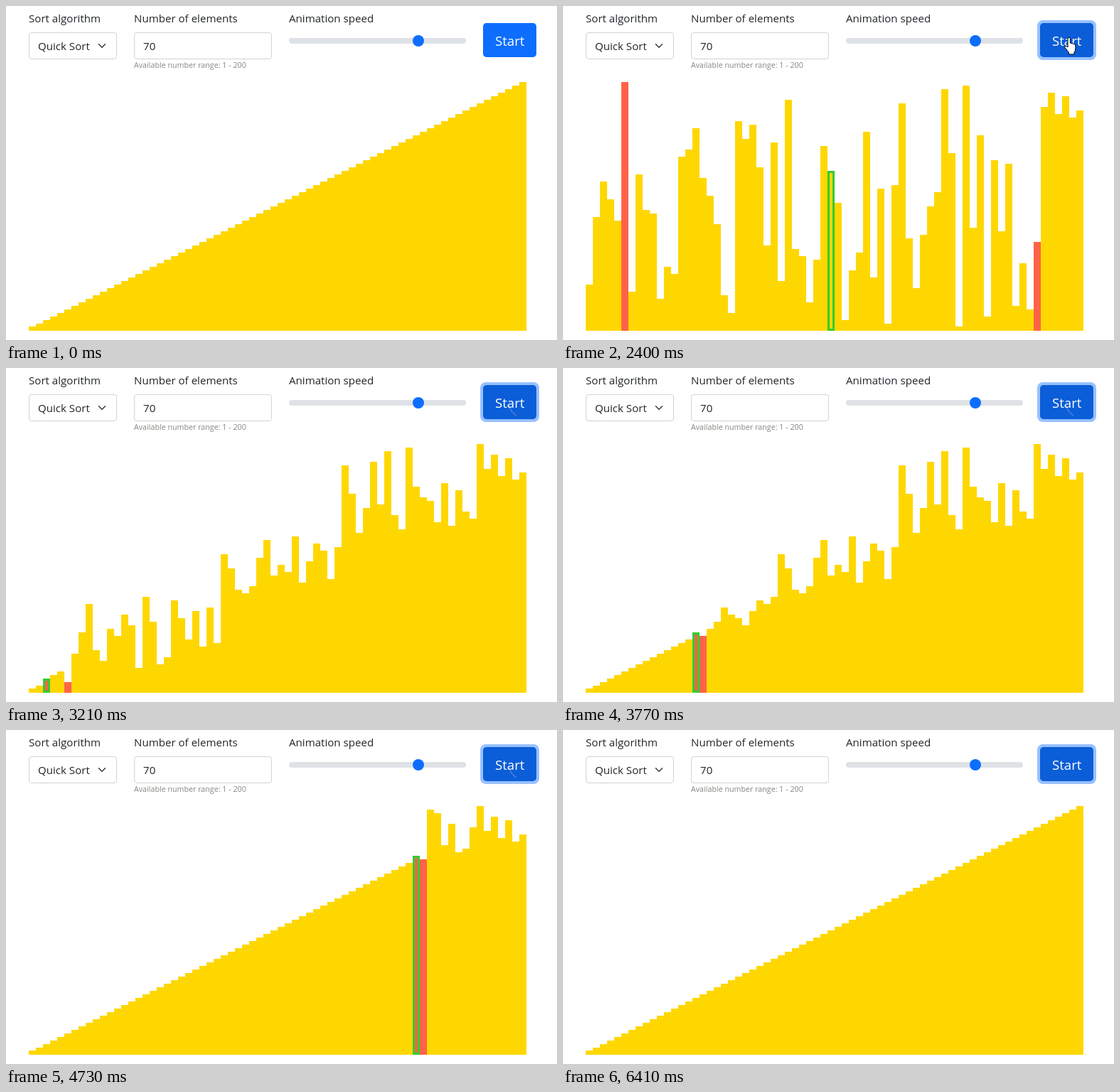
Write an HTML page that moves like this. It is 775 px wide and 470 px high and loops after 6.48 s.

```html
<!DOCTYPE html>
<html lang="en">
<head>
<meta charset="utf-8">
<title>Sort visualizer</title>
<style>
  html, body { margin: 0; height: 100%; overflow: hidden; background: #fff; }
  svg { display: block; font: 15.1px "Open Sans", "Noto Sans", sans-serif; fill: #212529; }
  .field { fill: #fff; stroke: #ced4da; }
  .cursor { fill: #fff; stroke: #000; stroke-linejoin: round; }
</style>
</head>
<body>
<svg width="775" height="470" viewBox="0 0 775 470">
  <text x="32" y="23">Sort algorithm</text>
  <rect class="field" x="32.5" y="37.5" width="123" height="37" rx="3.5"/>
  <text x="45" y="62">Quick Sort</text>
  <path d="M130.5 53.75l4.5 4.5 4.5-4.5" fill="none" stroke="#343a40" stroke-width="1.5" stroke-linecap="round" stroke-linejoin="round"/>

  <text x="180" y="23">Number of elements</text>
  <rect class="field" x="180.5" y="37.5" width="193" height="37" rx="3.5"/>
  <text x="193" y="62">70</text>
  <text x="180" y="87" font-size="10.7" fill="#8a8580">Available number range: 1 - 200</text>

  <text x="398" y="23">Animation speed</text>
  <rect x="398" y="45" width="249" height="8" rx="4" fill="#dee2e6"/>
  <circle cx="580" cy="49" r="8" fill="#0d6efd"/>

  <rect id="ring" x="667" y="20" width="83" height="56" rx="8" fill="#98c1fe"/>
  <rect id="button" x="671" y="24" width="75" height="48" rx="4.8"/>
  <path id="trail" d="M708 53q1 8 10 14" fill="none" stroke="#7f8fe0" stroke-width="2" opacity=".5"/>
  <text x="688" y="56" font-size="18.7" fill="#fff">Start</text>

  <path id="bars" fill="#ffd700"/>
  <path id="active" fill="#ff6347"/>
  <path id="pivot" fill="#32cd32" fill-rule="evenodd"/>

  <path id="arrow" class="cursor" d="M.5.5V16.5L4 13l2.7 6 2.4-1-2.6-6H11.5z"/>
  <path id="hand" class="cursor" d="M-1 14V3a1.7 1.7 0 0 1 3.4 0V9l5.5 1.5q2 .6 2 2.5v4q0 3-2 5.5V25H.5V22.5L-5 15.5q-1-2 1-2.3Q-2.5 13-1 15z"/>
</svg>
<script>
const LOOP = 6480, SORT_START = 2400, STEP = 13.09;
const $ = id => document.getElementById(id);
const show = (id, on) => $(id).setAttribute("visibility", on ? "visible" : "hidden");

const shuffled = [
  13, 32, 42, 37, 31, 70, 11, 44, 34, 33, 9, 18, 16, 49, 51, 57, 43, 38, 30, 10,
  5, 59, 54, 58, 46, 24, 53, 14, 65, 23, 21, 8, 20, 52, 45, 36, 3, 17, 22, 56,
  15, 40, 2, 41, 64, 26, 12, 27, 35, 39, 68, 50, 1, 69, 29, 55, 4, 48, 28, 47,
  7, 19, 6, 25, 63, 67, 61, 66, 60, 62];
const sorted = shuffled.map((_, i) => i + 1);

// Every swap is seen twice: before and after the exchange.
const steps = [];
function quickSort(a, lo, hi) {
  const mid = (lo + hi) >> 1, p = a[mid];
  const record = (...active) => steps.push({ a: a.slice(), mid, active });
  let i = lo, j = hi;
  while (i <= j) {
    while (a[i] < p) i++;
    while (a[j] > p) j--;
    if (i > j) break;
    if (i < j) {
      record(i, j);
      [a[i], a[j]] = [a[j], a[i]];
      record(i, j);
    }
    i++;
    j--;
  }
  if (lo < j) quickSort(a, lo, j);
  if (i < hi) quickSort(a, i, hi);
}
quickSort(shuffled.slice(), 0, shuffled.length - 1);

// The screen refreshes every 70 ms, counted anew from each of these times.
const anchors = [1390, 1990, 2120, 2450, 2790, 3480, 4170];
function refreshTime(t) {
  const from = anchors.filter(a => a <= t).pop();
  return from ? from + Math.floor((t - from) / 70) * 70 : 0;
}

// Pointer path: time, x, y
const path = [
  [1390, 767, 27], [1530, 737, 35], [1670, 722, 40], [1990, 714, 43],
  [2400, 711, 43], [2450, 712, 43], [2590, 738, 41], [2660, 767, 38]];
function pointerAt(t) {
  const n = path.findIndex(k => k[0] >= t);
  if (n < 0 || t < path[0][0]) return null;
  const b = path[n], a = path[n - 1] || b;
  const f = b === a ? 0 : (t - a[0]) / (b[0] - a[0]);
  return [a[1] + (b[1] - a[1]) * f, a[2] + (b[2] - a[2]) * f];
}

const barHeight = v => Math.max(6, v * 5);
function bar(v, i, inset = 0) {
  const x = 32 + i * 10 + inset, y = 457 - barHeight(v) + inset;
  return `M${x} ${y}h${10 - 2 * inset}V${457 - inset}H${x}z`;
}

function drawBars(t) {
  const k = Math.floor((t - SORT_START) / STEP + 0.5);
  const { a, mid, active } = steps[k] || { a: sorted, mid: -1, active: [] };
  $("bars").setAttribute("d", a.map((v, i) => bar(v, i)).join(""));
  $("active").setAttribute("d", active.map(i => bar(a[i], i)).join(""));
  $("pivot").setAttribute("d", mid < 0 ? "" : bar(a[mid], mid) + bar(a[mid], mid, 3));
}

function drawPointer(t) {
  const p = pointerAt(t), over = p && p[0] < 746;
  show("arrow", p && !over);
  show("hand", over);
  if (p) $(over ? "hand" : "arrow").setAttribute("transform", `translate(${p.map(Math.round)})`);
  const focused = t >= 2260;
  show("ring", focused);
  $("button").setAttribute("fill", over || focused ? "#0b5ed7" : "#0d6efd");
}

function frame() {
  const now = performance.now() % LOOP, t = refreshTime(now);
  drawBars(t);
  drawPointer(t);
  show("trail", now >= 2730 && now < 6410);
  requestAnimationFrame(frame);
}
frame();
</script>
</body>
</html>
```
